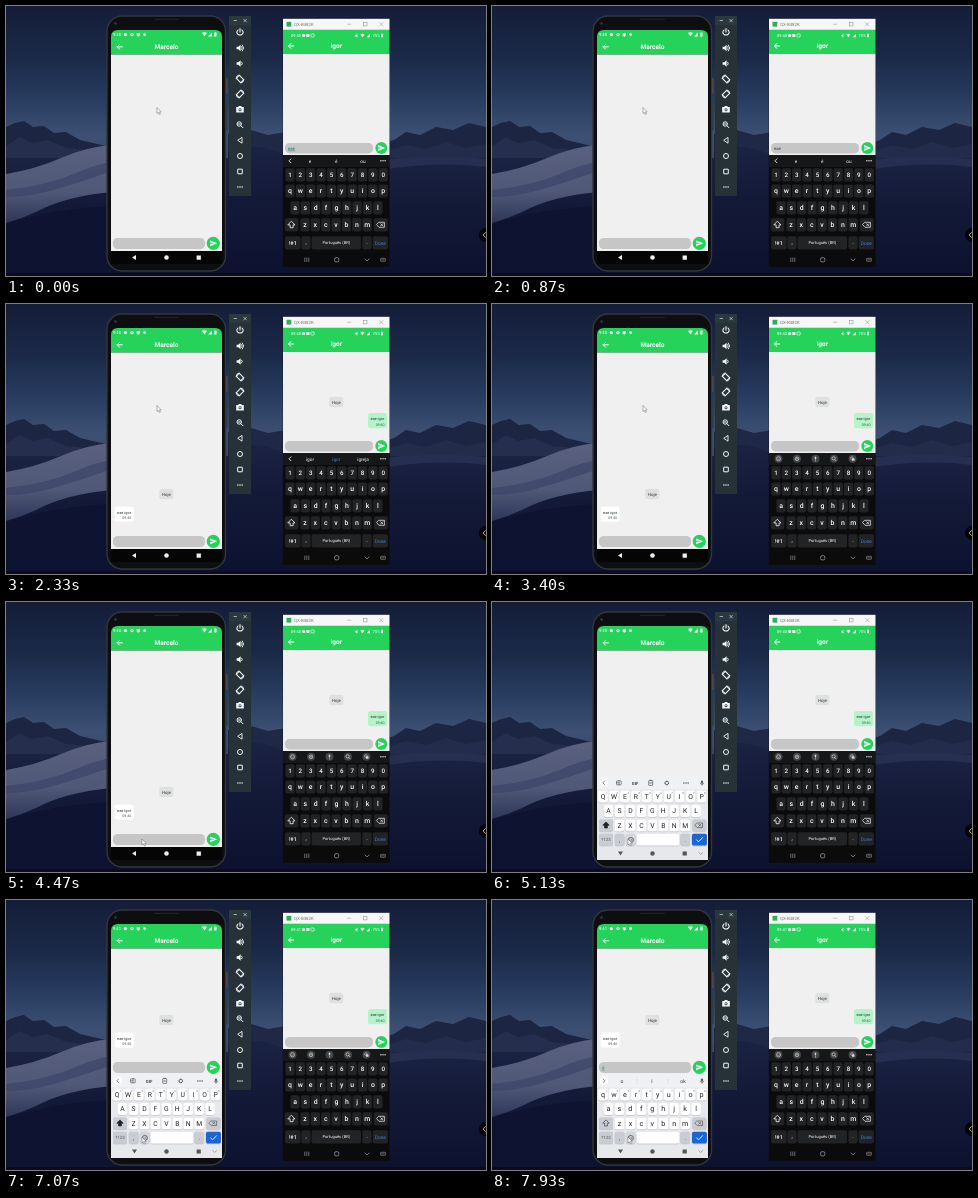
An HTML page for the animation above (8 s loop, 480 by 270 pixels).

```html
<!DOCTYPE html>
<html lang="pt">
<head>
<meta charset="utf-8">
<title>Chat</title>
<style>
html,body{margin:0;width:100%;height:100%;overflow:hidden;background:#0d1330}
svg{display:block;width:100%;height:100%;font-family:Roboto,"Noto Sans",sans-serif;text-rendering:geometricPrecision}
</style>
</head>
<body>
<svg id="stage" viewBox="0 0 480 270" xmlns="http://www.w3.org/2000/svg"></svg>
<script>
const LOOP = 8000, GREEN = '#25d35b', LIFT = 70;
const FRIEND = 'Marcelo', ME = 'Igor', MSG = 'eae igor';

// markup helpers
const rect = (x, y, w, h, fill, r = 0, more = '') =>
  `<rect x="${x}" y="${y}" width="${w}" height="${h}" rx="${r}" fill="${fill}" ${more}/>`;
const circ = (x, y, r, fill, more = '') => `<circle cx="${x}" cy="${y}" r="${r}" fill="${fill}" ${more}/>`;
const shape = (d, fill, more = '') => `<path d="${d}" fill="${fill}" ${more}/>`;
const line = (d, color, w = 0.8, more = '') =>
  `<path d="${d}" fill="none" stroke="${color}" stroke-width="${w}" stroke-linecap="round" stroke-linejoin="round" ${more}/>`;
const text = (x, y, s, size, fill, anchor = 'middle', more = '') =>
  `<text x="${x}" y="${y}" font-size="${size}" fill="${fill}" text-anchor="${anchor}" ${more}>${s}</text>`;
const group = (id, body, more = '') => `<g id="${id}" ${more}>${body}</g>`;
const at = (x, y, body, more = '') => `<g transform="translate(${x} ${y})${more}">${body}</g>`;
const grad = (id, ...stops) => `<linearGradient id="${id}" x2="0" y2="1">` +
  stops.map(([o, c]) => `<stop offset="${o}" stop-color="${c}"/>`).join('') + '</linearGradient>';
const dots = (x, y, color) => [-2.1, 0, 2.1].map(d => circ(x + d, y, 0.75, color)).join('');

const back = (x, y) => line(`M${x + 2.6} ${y}h-5.2m2.4 -2.4l-2.4 2.4l2.4 2.4`, '#fff', 1);
const send = (x, y, r) => circ(x, y, r, GREEN) +
  at(x, y, shape('M-3.2 -2.9L3.8 0L-3.2 2.9V.7L1.4 0L-3.2 -.7Z', '#fff'));
const today = (x, y) => rect(x - 7, y - 5.3, 14, 10.6, '#dfe1e1', 2.5) + text(x, y + 1.5, 'Hoje', 4.3, '#333');
const bubble = (x, y, fill) => rect(x, y, 19, 15.4, fill, 2.5) +
  text(x + 2.4, y + 7.2, MSG, 3.9, '#26352c', 'start') + text(x + 16.6, y + 12.7, '09:40', 3.6, '#4c5a52', 'end');
const keypad = (x, y) => rect(x - 2.4, y - 1.5, 4.8, 3, 'none', 0.4, 'stroke="#999" stroke-width=".6"') +
  line(`M${x - 1.2} ${y}h2.4`, '#999', 0.6);
const mic = (x, y) => rect(x - 0.9, y - 2.6, 1.8, 3.4, '#555', 0.9) +
  line(`M${x - 1.8} ${y}q0 1.6 1.8 1.6t1.8 -1.6M${x} ${y + 1.6}v1`, '#555', 0.5);

function backdrop() {
  return rect(0, 0, 480, 270, 'url(#sky)') +
    // far ridges
    shape('M0 121L9 117L18 115L27 121L38 120L48 127L60 126L74 134L104 141V170H0Z', '#1c2541') +
    shape('M0 140L14 131L26 137L42 134L60 142L104 146V170H0Z', '#252e4c') +
    shape('M222 128L245 124L262 129L280 126V170H222Z', '#1f2946') +
    shape('M376 138L388 134L400 126L414 129L430 121L447 124L463 117L480 121V170H376Z', '#1c2541') +
    shape('M376 147L400 139L420 143L440 136L460 142L480 138V170H376Z', '#232c4a') +
    // dunes
    rect(0, 152, 480, 118, 'url(#dune)') +
    shape('M222 146Q250 134 280 150V270H222Z', 'url(#dune)') +
    shape('M0 168Q30 163 55 152T106 139V186Q60 190 30 206Q15 213 0 217Z', 'url(#lit)') +
    shape('M0 184Q40 180 70 167Q90 158 106 156V165Q70 178 40 186Q20 191 0 191Z', '#3c4568', 'opacity=".7"') +
    shape('M376 154Q430 148 480 153V161Q430 155 376 164Z', '#262f50') +
    shape('M0 218Q50 202 106 200V270H0Z', '#0d1330') +
    rect(0, 267, 480, 3, '#0e0a1c') +
    circ(480, 229, 7.2, '#050507') + line('M479.4 226.6l-2.2 2.4l2.2 2.4', '#d8c67a', 0.9);
}

function toolbar() {
  const c = '#f4f7f8', x = 234, ring = (y, r) => circ(x, y, r, 'none', `stroke="${c}" stroke-width="1"`);
  const speaker = (y, waves) => shape(`M${x - 3.4} ${y - 1.2}h1.7l2.3 -2v6.4l-2.3 -2h-1.7Z`, c) +
    line(`M${x + 1.7} ${y - 1.4}q1.2 1.4 0 2.8` + (waves ? `M${x + 2.4} ${y - 3}q2.6 3 0 6` : ''), c, 0.9);
  const turn = (y, s) => at(x, y, rect(-2.1, -3.1, 4.2, 6.2, 'none', 0.5, `stroke="${c}" stroke-width="1.1" transform="rotate(-45)"`) +
    line('M-4 -.6q.2 -2.9 3 -3.6M4 .6q-.2 2.9 -3 3.6', c, 0.8), ` scale(${s} 1)`);
  return rect(223, 10, 22, 180, '#263238') + rect(223, 10, 22, 9, '#2b383e') +
    line('M228 14.5h2.6M237.8 13.3l2.6 2.6m0 -2.6l-2.6 2.6', c, 0.6) +
    line(`M${x - 2} 24q-2.2 2.4 -.2 4.2q2.2 1.7 4.4 0q2 -1.8 -.2 -4.2M${x} 22.5v3.6`, c, 1.1) +
    speaker(42, 1) + speaker(57.5, 0) + turn(73, 1) + turn(88, -1) +
    shape(`M${x - 3.8} 101.1h1.9l.8 -1.1h2.2l.8 1.1h1.9v5.4h-7.6Z`, c) + circ(x, 103.7, 1.5, '#263238') + circ(x, 103.7, 0.8, c) +
    circ(x - 0.8, 118, 2.2, 'none', `stroke="${c}" stroke-width="1"`) + line(`M${x + 1} 119.8l2 2M${x - 1.8} 118h2`, c, 1) +
    line(`M${x + 2} 131.8v5.4l-4 -2.7Z`, c, 0.9) + ring(150, 2.5) +
    rect(x - 2.3, 163.2, 4.6, 4.6, 'none', 0.2, `stroke="${c}" stroke-width="1"`) + dots(x, 181, c);
}

function softKeys() {
  const key = (x, y, w, fill = '#fff') => rect(x - w / 2, y - 5.9, w, 11.8, fill, 1.8, 'filter="url(#lip)"');
  const rows = [['qwertyuiop', 111, 194.5], ['asdfghjkl', 116.5, 209], ['zxcvbnm', 127.5, 223.3]];
  let keys = '', low = '', up = '';
  rows.forEach(([s, x0, y], r) => [...s].forEach((ch, i) => {
    const x = x0 + i * 10.95;
    keys += key(x, y, 9.7) + (r ? '' : text(x + 3.3, y - 2.7, (i + 1) % 10, 2.8, '#666'));
    low += text(x, y + 2.3, ch, 7.2, '#222');
    up += text(x, y + 2.4, ch.toUpperCase(), 6.8, '#222');
  }));
  const shift = (c, f) => shape('M114 219.9l3.2 3.3h-1.8v2.8h-2.8v-2.8h-1.8Z', f, `stroke="${c}" stroke-width=".7"`);
  const tools = line('M112.6 179l-1.7 1.8l1.7 1.8', '#444', 0.7) +
    rect(124.6, 178.8, 4.6, 4, 'none', 0.5, 'stroke="#555" stroke-width=".7"') + line('M127 178.8v4M124.6 180.8h2.4', '#555', 0.6) +
    text(143, 182.6, 'GIF', 4.3, '#444', 'middle', 'font-weight="700"') +
    rect(156.7, 178.6, 4, 4.8, 'none', 0.5, 'stroke="#555" stroke-width=".7"') + line('M157.9 178.3h1.6M157.8 181h1.8', '#555', 0.8) +
    circ(174.8, 181, 1.8, 'none', 'stroke="#555" stroke-width="1" stroke-dasharray="1 .4"') + circ(174.8, 181, 1.7, 'none', 'stroke="#555" stroke-width=".6"') +
    dots(194, 181, '#555');
  const words = line('M111.2 179l1.7 1.8l-1.7 1.8', '#444', 0.7) + text(130, 182.8, 'o', 5, '#333') +
    text(160, 182.8, 'I', 5, '#333') + text(191, 182.8, 'ok', 5, '#333') + line('M145 179v4M176 179v4', '#cfd2d6', 0.5);
  return rect(105, 174, 111, 84, '#e6e8ec') + rect(105, 174, 111, 13.5, '#eff1f4') + circ(112, 180.8, 4.2, '#fff') +
    mic(210, 181) + group('tools', tools) + group('words', words) + keys +
    key(114, 223.3, 14, '#c9cdd3') + key(207.4, 223.3, 14, '#c9cdd3') +
    group('low', low + shift('#444', 'none')) + group('up', up + shift('#222', '#222')) +
    line('M205.2 221h5.4v4.6h-5.4l-2.2 -2.3ZM206.8 222.3l2 2m0 -2l-2 2', '#444', 0.6) +
    key(114, 237.7, 14, '#c9cdd3') + text(114, 239.2, '?123', 4.4, '#555') +
    key(127.6, 237.7, 9.7, '#c9cdd3') + text(127.6, 239.5, ',', 6, '#444') + key(138.6, 237.7, 9.7, '#d3d6db') +
    circ(138.8, 238, 2.6, 'none', 'stroke="#444" stroke-width=".7"') + line('M137.5 238.7q1.3 1.3 2.6 0M137.9 237.2h.1M139.6 237.2h.1', '#444', 0.6) +
    key(166, 237.7, 42.5) + key(193.2, 237.7, 9.7, '#c9cdd3') + text(193.2, 239.5, '.', 6, '#444') +
    key(207.4, 237.7, 15, '#1b66d2') + line('M204.6 237.8l2 2l3.8 -4', '#fff', 0.9) +
    shape('M126 249.6h5l-2.5 3.8Z', '#555') + circ(160.5, 251.5, 2.2, '#555') + rect(190.6, 249.4, 4.2, 4.2, '#555', 0.3) +
    line('M206.8 250.6l1.9 1.8l1.9 -1.8', '#777', 0.6);
}

function leftPhone() {
  return rect(219.5, 72, 2, 16, '#5e4a43', 0.6) + rect(219.5, 97, 2, 27, '#3a3b42', 0.6) +
    rect(101, 10, 118.5, 255, '#0d0e10', 15, 'stroke="#34363b" stroke-width="1.4"') +
    rect(148, 12.8, 25, 1.2, '#1f2125', 0.6) + circ(109.5, 17.5, 1.8, '#1d2230') + circ(109.5, 17.5, 0.7, '#3a465f') +
    `<g clip-path="url(#screen)">` + rect(105, 24, 111, 24.5, GREEN) + rect(105, 48.5, 111, 197, '#f0f0f0') +
    rect(105, 245, 111, 13, '#050505') +
    text(107, 30.2, '<tspan id="clockL">9:40</tspan>', 4.2, '#fff', 'start') +
    circ(119.3, 28.6, 1.6, '#fff') + circ(126, 28.6, 1.7, '#fff') + circ(126, 28.6, 0.7, GREEN) +
    shape('M130.7 27.1h3v2.4l-1.5 1.2l-1.5 -1.2Z', '#fff') + circ(138.5, 28.6, 1.4, '#fff') +
    shape('M196 27.1q2.4 -1.7 4.8 0l-2.4 3.3Z', '#fff') + shape('M206 26.5v3.9h-3.9Z', '#fff') + rect(208.2, 26.6, 2.3, 3.9, '#fff', 0.4) +
    back(113.7, 40.8) + text(160.5, 43.2, FRIEND, 6.6, '#fff', 'middle', 'font-weight="600"') +
    shape('M130 249v5l-4 -2.5Z', '#eee') + circ(160.5, 251.5, 2.3, '#eee') + rect(190.6, 249.4, 4.3, 4.3, '#eee', 0.2) +
    group('chatL', group('msgL', today(160.3, 190) + bubble(108.7, 202.4, '#fff')) +
      rect(107, 232, 92, 11, '#c6c6c6', 4.6) + send(207.3, 237.3, 6.6) +
      group('draftL', text(110, 239, 'o', 4.4, '#24765c', 'start') + line('M110 240.2h2.4', '#24765c', 0.4)) +
      rect(110, 234.7, 0.6, 5.6, '#1f9c70', 0, 'id="caretL"')) +
    group('softKeys', softKeys()) + '</g>';
}

const LETTERS = [['1234567890', 284, 168.8], ['qwertyuiop', 284, 185], ['asdfghjkl', 289, 201.8], ['zxcvbnm', 299, 218.8]];
const KEY = '#222325', PRESSED = '#4a4c50';

function darkKeys() {
  const key = (x, y, w, id = '') => rect(x - w / 2, y - 6.6, w, 13.2, KEY, 1.8, id && `id="k-${id}"`);
  const white = '#fafafa', bold = 'font-weight="500"';
  let out = rect(277, 149, 106, 111, '#0b0b0c') + rect(277, 149, 106, 12, '#161718');
  LETTERS.forEach(([s, x0, y], r) => [...s].forEach((ch, i) => {
    const x = x0 + i * 10.36;
    out += key(x, y, 9.3, ch) + text(x, y + 2, ch, r ? 6.9 : 6.2, white, 'middle', bold);
  }));
  out += key(285.6, 218.8, 13.5) + line('M285.6 215.5l3.4 3.4h-1.9v2.8h-3v-2.8h-1.9Z', white, 0.8) +
    key(374.8, 218.8, 14) + line('M373 216.3h5.4v5h-5.4l-2.2 -2.5ZM374.7 217.8l2 2m0 -2l-2 2', white, 0.7) +
    key(286.8, 236.8, 15.5) + text(286.8, 238.7, '!#1', 5.4, white, 'middle', bold) + key(300, 236.8, 9.3) + text(300, 238.4, ',', 6, white) +
    key(330.3, 236.8, 49.4, 'space') + text(330.3, 238.3, 'Português (BR)', 4.1, white) +
    key(361, 236.8, 9.3) + text(361, 238.4, '.', 6, white) + key(374.3, 236.8, 15.2) + text(374.3, 238.5, 'Done', 4.8, '#3f7fe0') +
    line('M298.8 252v3.6M300.8 252v3.6M302.8 252v3.6', '#aaa', 0.6) +
    rect(328.6, 251.7, 4.2, 4.2, 'none', 1.4, 'stroke="#aaa" stroke-width=".7"') +
    line('M359 253l2 1.9l2 -1.9', '#aaa', 0.7) + keypad(377, 253.8);
  const c = '#d5d7d9', disc = x => circ(x, 154.8, 4, '#434547');
  out += group('hints', line('M285 152.8l-2 2l2 2', '#eee', 0.9) +
    [304, 330.3, 357].map((x, i) => text(x, 156.5, '', 4.7, white, 'middle', `id="hint${i}"`)).join('')) +
    group('icons', [286.5, 305, 323.5, 342, 360.5].map(disc).join('') +
      circ(286.5, 154.8, 2.1, 'none', `stroke="${c}" stroke-width=".6"`) + line('M285.5 155.4q1 1 2 0M285.8 154h.1M287.2 154h.1', c, 0.5) +
      circ(305, 154.8, 1.8, 'none', `stroke="${c}" stroke-width=".7"`) + circ(305, 154.8, 0.7, c) +
      rect(322.8, 152.6, 1.4, 2.8, c, 0.7) + line('M323.5 156.2v.9', c, 0.6) +
      circ(341.6, 154.4, 1.6, 'none', `stroke="${c}" stroke-width=".7"`) + line('M342.8 155.6l1.2 1.2', c, 0.7) +
      rect(358.8, 153, 2.3, 2.3, 'none', 0.4, `stroke="${c}" stroke-width=".6"`) + rect(360, 154.3, 2.5, 2.5, c, 0.4)) +
    dots(377, 154.8, '#e4e4e4');
  return out;
}

function rightPhone() {
  return rect(276.8, 12.8, 106.7, 248, '#0a0a0a') + rect(277, 12.8, 106.5, 11.2, '#f7f7f8') + rect(280.5, 15.8, 4.8, 4.8, '#2fae5a') +
    text(288, 19.9, 'QX-B482K', 4.4, '#777', 'start') +
    line('M341.5 18.2h3.4M373.6 16.5l3.4 3.4m0 -3.4l-3.4 3.4', '#888', 0.5) +
    rect(357.6, 16.5, 3.4, 3.4, 'none', 0, 'stroke="#888" stroke-width=".5"') +
    rect(277, 23.7, 106.5, 24.3, GREEN) + rect(277, 48, 106.5, 101, '#f0f0f0') +
    text(285, 31, '<tspan id="clockR">09:40</tspan>', 4, '#fff', 'start') +
    circ(297.6, 29.5, 1.6, '#fff') + rect(300.4, 28, 3, 3, '#fff', 0.5) + rect(305, 28, 3.2, 3, 'none', 0.5, 'stroke="#fff" stroke-width=".6"') +
    shape('M349 29h1l1.4 -1.2v3.6l-1.4 -1.2h-1Z', '#fff') + shape('M354.3 28.4q2 -1.4 4 0l-2 2.8Z', '#fff') +
    shape('M364 27.8v3.4h-3.4Z', '#fff') + text(374, 31, '75%', 4, '#fff', 'end') + rect(375, 27.8, 2, 3.4, '#fff', 0.4) +
    back(285, 40) + text(330.3, 42.4, ME, 6.6, '#fff', 'middle', 'font-weight="600"') +
    group('msgR', today(330.3, 98) + bubble(362, 108.9, '#b4f4c8')) +
    rect(279, 137, 88, 10.4, '#c6c6c6', 4.4) + send(375.3, 142, 6) +
    text(282, 143.7, '', 4.3, '#333', 'start', 'id="draftR"') + darkKeys();
}

const stage = document.getElementById('stage');
stage.innerHTML = '<defs>' +
  grad('sky', [0, '#141d38'], [0.2, '#1b2a49'], [0.36, '#2a3f63'], [0.48, '#3d5073'], [1, '#2a3048']) +
  grad('dune', [0, '#1b2342'], [0.4, '#131a38'], [1, '#0c112e']) +
  grad('lit', [0, '#59617f'], [0.6, '#505877'], [1, '#2f3759']) +
  '<clipPath id="screen"><path d="M105 258V31q0 -7 7 -7H209q7 0 7 7V258Z"/></clipPath>' +
  '<filter id="lip"><feDropShadow dx="0" dy=".5" stdDeviation=".2" flood-color="#8a8f98" flood-opacity=".6"/></filter></defs>' +
  backdrop() + leftPhone() + toolbar() + rightPhone() +
  group('mouse', shape('M0 0V6L1.4 4.8L2.4 7L3.4 6.5L2.4 4.4H4.2Z', '#fff', 'stroke="#666" stroke-width=".5"'));

const $ = id => document.getElementById(id);
const show = (id, on) => $(id).setAttribute('visibility', on ? 'inherit' : 'hidden');
const move = (id, x, y) => $(id).setAttribute('transform', `translate(${x} ${y})`);
const put = (id, s) => { if ($(id).textContent !== s) $(id).textContent = s; };
const ease = p => p * p * (3 - 2 * p);
const part = (t, a, b) => Math.min(1, Math.max(0, (t - a) / (b - a)));

// time, key pressed, suggestions after it
const strokes = [
  [-1, '', 'e,é,ou'], [470, 'space', 'e,é,ou'], [930, 'i', 'i,isso,ir'],
  [1200, 'g', 'ig,igual,igreja'], [1400, 'o', 'igo,igor,igual'], [1670, 'r', 'igor,igor,igreja']
];
const SENT = 2130, GOT = 2330, KEYS_UP = 4930, RESIZE = 5200, MINUTE = 5730, TYPED = 7530;

function draw(t) {
  const n = strokes.filter(s => s[0] <= t).length - 1, sent = t >= SENT;
  const word = MSG.slice(4, 3 + n), u = s => `<tspan fill="#1d6a66" text-decoration="underline">${s}</tspan>`;
  const draft = sent ? '' : n ? 'eae ' + (word && u(word)) : u('eae');
  if ($('draftR').dataset.v !== draft) {
    $('draftR').innerHTML = draft;
    $('draftR').dataset.v = draft;
  }
  strokes.forEach(([a, k]) => k && $('k-' + k).setAttribute('fill', t >= a && t < a + 100 ? PRESSED : KEY));
  strokes[n][2].split(',').forEach((s, i) => put('hint' + i, s));
  $('hint1').setAttribute('fill', n > 1 ? '#3f7fe0' : '#f2f2f2');
  show('hints', t < 2930);
  show('icons', t >= 2930);
  show('msgR', sent);
  show('msgL', t >= GOT);

  const a = ease(part(t, 3500, 4070)), b = part(t, 4070, 4200);
  move('mouse', 151 - 27 * a + 12 * b, 101.5 + 90 * a + 45.5 * b);

  show('softKeys', t >= KEYS_UP);
  move('softKeys', 0, 84 * (1 - part(t, KEYS_UP, 5100)) ** 2);
  move('chatL', 0, t >= RESIZE ? -LIFT : 0);
  const typed = t >= TYPED;
  for (const id of ['draftL', 'words', 'low']) show(id, typed);
  for (const id of ['tools', 'up']) show(id, !typed);
  show('caretL', t >= 4530 && !typed && (t - 5270 + 1000) % 1000 < 500);

  const m = t >= MINUTE ? '41' : '40';
  put('clockL', '9:' + m);
  put('clockR', '09:' + m);
}

const start = performance.now();
function tick() {
  draw((performance.now() - start) % LOOP);
  requestAnimationFrame(tick);
}
tick();
</script>
</body>
</html>
```
